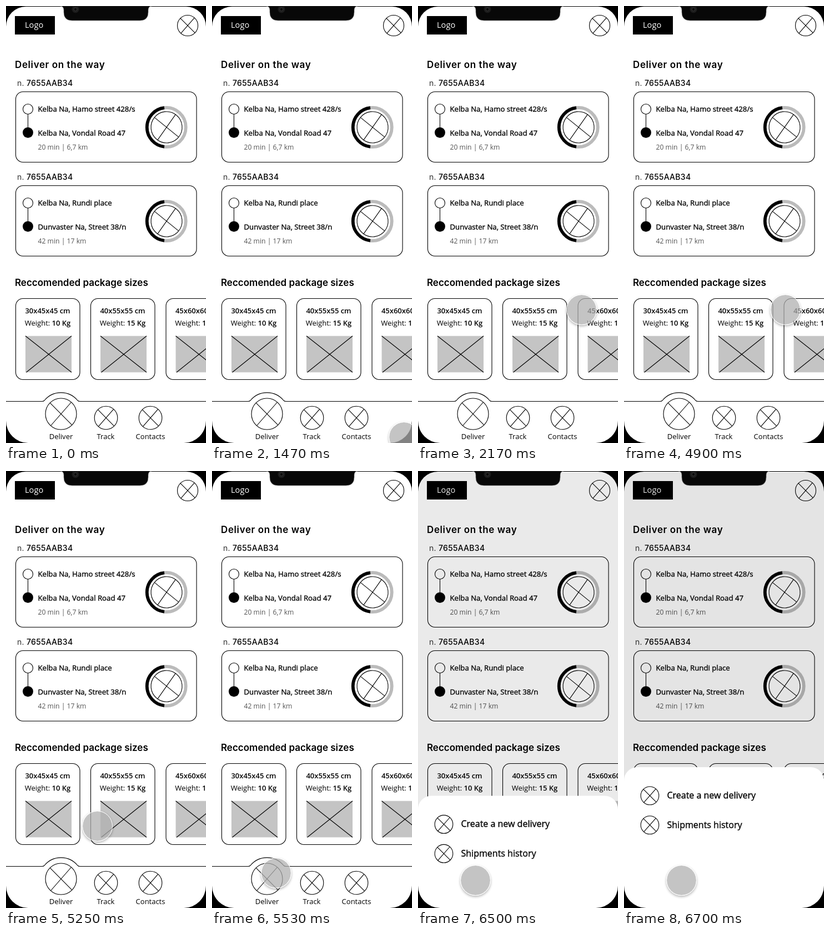
These frames come from a looping animation (360x782 px, 8000 ms). An HTML page:

```html
<!DOCTYPE html>
<html lang="en">
<head>
<meta charset="utf-8">
<title>Delivery wireframe</title>
<style>
  html, body { margin: 0; width: 100%; height: 100%; overflow: hidden; background: #fff; }
  body { position: relative; }
  svg { position: absolute; left: 0; top: 0; display: block; }
  text { font-family: "Open Sans", "Noto Sans", sans-serif; font-size: 13px; fill: #000; }
  .line { fill: none; stroke: #000; stroke-width: 1.1; }
  .line * { vector-effect: non-scaling-stroke; }
  .logo { font-size: 14.6px; fill: #fff; }
  .head { font: 600 17px Inter, sans-serif; letter-spacing: .6px; }
  .head.long { letter-spacing: 0; }
  .num { font: 500 14px Inter, sans-serif; letter-spacing: .3px; }
  .light { font-weight: 400; fill: #333; }
  /* a hairline stroke gives a medium weight */
  .place, .item { stroke: #000; stroke-width: .35px; }
  .place { font-size: 13.2px; }
  .item { font-size: 16px; }
  .info { font-size: 12.2px; fill: #555; }
  .size { font-weight: 600; text-anchor: middle; }
  .mid { text-anchor: middle; }
  .bold { font-weight: 600; }

  .shade { opacity: 0; animation: shade 8s infinite; }
  .sheet { transform: translateY(254px); animation: sheet 8s infinite; }
  .dot {
    position: absolute; left: 354px; top: 812px;
    box-sizing: border-box; width: 55px; height: 55px; margin: -27.5px;
    border: 1px solid #fff; border-radius: 50%;
    background: rgba(176, 176, 176, .74); background-clip: padding-box;
    box-shadow: 0 2px 4px rgba(0, 0, 0, .3);
    animation: dot-x 8s infinite, dot-y 8s infinite, dot-show 8s step-end infinite;
  }
  @keyframes shade {
    0%, 77.3% { opacity: 0; animation-timing-function: ease-out; }
    83.75%, 100% { opacity: .105; }
  }
  @keyframes sheet {
    0%, 77.3% { transform: translateY(254px); animation-timing-function: ease-out; }
    83.75%, 100% { transform: none; }
  }
  @keyframes dot-show {
    0% { visibility: hidden; }
    18.3%, 100% { visibility: visible; }
  }
  @keyframes dot-x {
    0%, 17.06% { left: 354px; animation-timing-function: ease; }
    27.125%, 60.875% { left: 294px; animation-timing-function: cubic-bezier(.31, .1, .31, 1); }
    71.3% { left: 110px; animation-timing-function: ease-out; }
    74.375%, 100% { left: 103px; }
  }
  @keyframes dot-y {
    0%, 17.06% { top: 812px; animation-timing-function: ease; }
    27.125%, 60.875% { top: 543px; animation-timing-function: cubic-bezier(.4, 0, .5, 1); }
    71.3% { top: 731.5px; animation-timing-function: ease-out; }
    74.375%, 100% { top: 732.5px; }
  }
</style>
</head>
<body>
<svg width="360" height="782" viewBox="0 0 360 782">
  <defs>
    <g id="cross" class="line">
      <circle r="1"/>
      <path d="M-.7-.7 .7 .7M.66-.75-.66 .75"/>
    </g>
    <g id="route">
      <rect class="line" x="17.5" y="153.5" width="325.5" height="126" rx="13"/>
      <path class="line" d="M39.5 193.5V218"/>
      <circle class="line" cx="39.5" cy="184.5" r="9"/>
      <circle cx="39.5" cy="226.5" r="9.5"/>
      <g fill="none" stroke-width="5.8">
        <path stroke="#bbb" d="M285 182.2A35 35 0 1 1 285 251.800"/>
        <path stroke="#000" d="M285 182.2A35 35 0 0 0 285 251.800"/>
      </g>
      <use href="#cross" transform="translate(289 217) rotate(-6) scale(28)"/>
    </g>
    <g id="pack">
      <rect class="line" x="17.5" y="523.5" width="115.5" height="145" rx="13"/>
      <rect x="35" y="590.5" width="83" height="65" fill="#c4c4c4"/>
      <path class="line" d="M35 590.5 118 655.5M118 590.5 36.5 655.5"/>
    </g>
  </defs>

  <rect width="360" height="782" fill="#fff"/>
  <rect x="16" y="18" width="72" height="33"/>
  <text class="logo" x="34" y="39">Logo</text>
  <use href="#cross" transform="translate(327 35) scale(18.5)"/>

  <text class="head" x="16" y="111">Deliver on the way</text>
  <text class="num light" x="20" y="143">n.</text>
  <text class="num" x="37" y="143">7655AAB34</text>
  <use href="#route"/>
  <text class="place" x="57.5" y="188.5">Kelba Na, Hamo street 428/s</text>
  <text class="place" x="57.5" y="231.5">Kelba Na, Vondal Road 47</text>
  <text class="info" x="57.5" y="257">20 min | 6,7 km</text>

  <text class="num light" x="20" y="311">n.</text>
  <text class="num" x="37" y="311">7655AAB34</text>
  <use href="#route" y="168"/>
  <text class="place" x="57.5" y="356.5">Kelba Na, Rundi place</text>
  <text class="place" x="57.5" y="399.5">Dunvaster Na, Street 38/n</text>
  <text class="info" x="57.5" y="425">42 min | 17 km</text>

  <text class="head long" x="16" y="501">Reccomended package sizes</text>
  <use href="#pack"/>
  <text class="size" x="75" y="550">30x45x45 cm</text>
  <text class="mid" x="75" y="572">Weight: <tspan class="bold">10 Kg</tspan></text>
  <use href="#pack" x="135"/>
  <text class="size" x="210" y="550">40x55x55 cm</text>
  <text class="mid" x="210" y="572">Weight: <tspan class="bold">15 Kg</tspan></text>
  <use href="#pack" x="270.5"/>
  <text class="size" x="345.5" y="550">45x60x60 cm</text>
  <text class="mid" x="345.5" y="572">Weight: <tspan class="bold">18 Kg</tspan></text>

  <path class="line" d="M0 707.5H65Q67.500 707.5 69 706A39 39 0 0 1 129 706Q130.500 707.5 133 707.5H360"/>
  <use href="#cross" transform="translate(99 730) scale(28)"/>
  <use href="#cross" transform="translate(180 737) scale(20.8)"/>
  <use href="#cross" transform="translate(260 737) scale(20.8)"/>
  <text class="mid" x="99" y="775">Deliver</text>
  <text class="mid" x="179.5" y="775">Track</text>
  <text class="mid" x="260" y="775">Contacts</text>

  <rect class="shade" width="360" height="782"/>
  <g class="sheet">
    <rect y="530" width="360" height="290" rx="24" fill="#fff"/>
    <use href="#cross" transform="translate(46.5 581) scale(16.3)"/>
    <use href="#cross" transform="translate(46.5 633.5) scale(16.3)"/>
    <text class="item" x="77.5" y="585.5">Create a new delivery</text>
    <text class="item" x="77.5" y="639">Shipments history</text>
  </g>

  <!-- phone bezel and notch -->
  <path fill-rule="evenodd" d="M0 0H360V782H0ZM0 37V742A40 40 0 0 0 40 782H320A40 40 0 0 0 360 742V37A36 36 0 0 0 324 1H36A36 36 0 0 0 0 37Z"/>
  <path fill="#080808" stroke="#777" stroke-width=".6" d="M98 0Q104 1 104 7V11Q104 26 119 26H241Q256 26 256 11V7Q256 1 262 0Z"/>
  <circle cx="125" cy="6" r="6.5" fill="#1c1c1c"/>
  <circle cx="125" cy="6" r="3" fill="#0c0c0c" stroke="#333"/>
</svg>
<div class="dot"></div>
</body>
</html>
```
